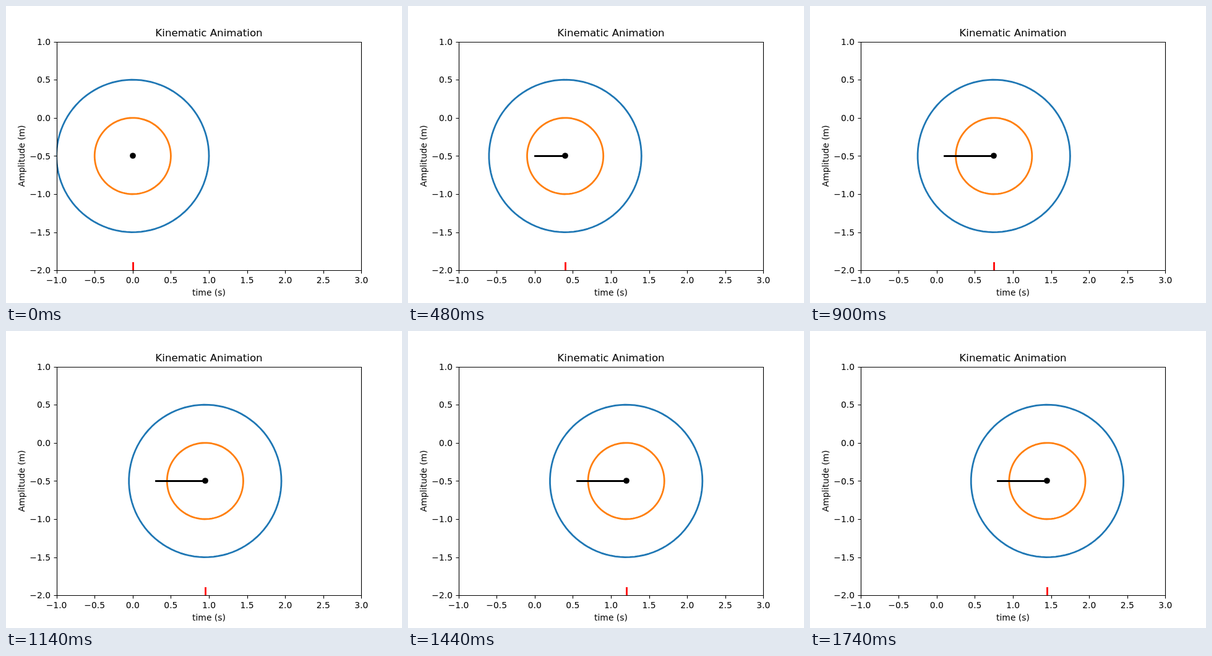
Animation, 640 px wide and 480 px high, one loop 1800 ms. Source, as an HTML page:

```html
<!DOCTYPE html>
<html lang="en">
<head>
<meta charset="utf-8">
<title>Kinematic Animation</title>
<style>
  html, body { margin: 0; width: 100%; height: 100%; overflow: hidden; background: #fff; }
  svg { display: block; width: 640px; height: 480px; }
  text { font: 13.889px "DejaVu Sans", sans-serif; text-anchor: middle; }
  .title { font-size: 16.667px; }
  .y-tick { text-anchor: end; }
  .axis { fill: none; stroke: #000; stroke-width: 1.11; }
  .curve { fill: none; stroke-width: 2.78; stroke-linecap: square; stroke-linejoin: round; }
</style>
</head>
<body>
<svg id="stage" viewBox="0 0 640 480">
  <clipPath id="plot"><rect x="81.6" y="57.6" width="492.8" height="369.6"/></clipPath>
</svg>
<script>
const STEP_MS = 60, STEPS = 30, STEP = 0.05, TRAIL_STEPS = 13;
const UNIT = 123.2;
const stage = document.getElementById('stage');

const toX = v => 81.6 + (v + 1) * UNIT;
const toY = v => 57.6 + (1 - v) * UNIT;
const snap = v => Math.floor(v + 0.5) + 0.5;

function add(parent, tag, attrs, text = '') {
  const node = document.createElementNS('http://www.w3.org/2000/svg', tag);
  for (const key in attrs) node.setAttribute(key, attrs[key]);
  node.textContent = text;
  return parent.appendChild(node);
}

function ring(radius) {
  const points = Array.from({ length: 100 }, (_, i) => {
    const angle = i / 99 * 2 * Math.PI;
    return [radius * UNIT * Math.cos(angle), -radius * UNIT * Math.sin(angle)]
      .map(v => v.toFixed(3)).join(' ');
  });
  return 'M' + points.join('L');
}

const plot = add(stage, 'g', { 'clip-path': 'url(#plot)' });
const curve = (stroke, d = '') => add(plot, 'path', { class: 'curve', stroke, d });
const rings = [curve('#1f77b4', ring(1)), curve('#ff7f0e', ring(0.5))];
const trail = curve('#000');
const marker = curve('#f00');
const dot = add(plot, 'circle', { r: 4.86, cy: 242 });

function drawAxes() {
  const label = v => v.toFixed(1).replace('-', '\u2212');
  let d = 'M82.5 58.5H574.5V427.5H82.5Z';
  for (let v = -1; v <= 3; v += 0.5) {
    d += `M${snap(toX(v))} 427.5v5`;
    add(stage, 'text', { x: toX(v), y: 448 }, label(v));
  }
  for (let v = -2; v <= 1; v += 0.5) {
    d += `M82.5 ${snap(toY(v))}h-5`;
    add(stage, 'text', { class: 'y-tick', x: 72, y: Math.round(toY(v) + 5.2) }, label(v));
  }
  add(stage, 'path', { class: 'axis', d });
  add(stage, 'text', { class: 'title', x: 328, y: 49 }, 'Kinematic Animation');
  add(stage, 'text', { x: 328, y: 468 }, 'time (s)');
  add(stage, 'text', { transform: 'translate(29.5 242.4) rotate(-90)' }, 'Amplitude (m)');
}

function render(ms) {
  const step = Math.floor(ms / STEP_MS) % STEPS;
  const x = toX(step * STEP);
  const tail = toX(Math.max(0, step - TRAIL_STEPS) * STEP);
  rings.forEach(r => r.setAttribute('transform', `translate(${x} ${toY(-0.5)})`));
  trail.setAttribute('d', `M${snap(tail)} 242.5H${snap(x)}`);
  marker.setAttribute('d', `M${snap(x)} 427.5V415.5`);
  dot.setAttribute('cx', Math.floor(x + 0.5));
}

drawAxes();
render(0);
const start = performance.now();
function tick() {
  render(performance.now() - start);
  requestAnimationFrame(tick);
}
requestAnimationFrame(tick);
</script>
</body>
</html>
```
